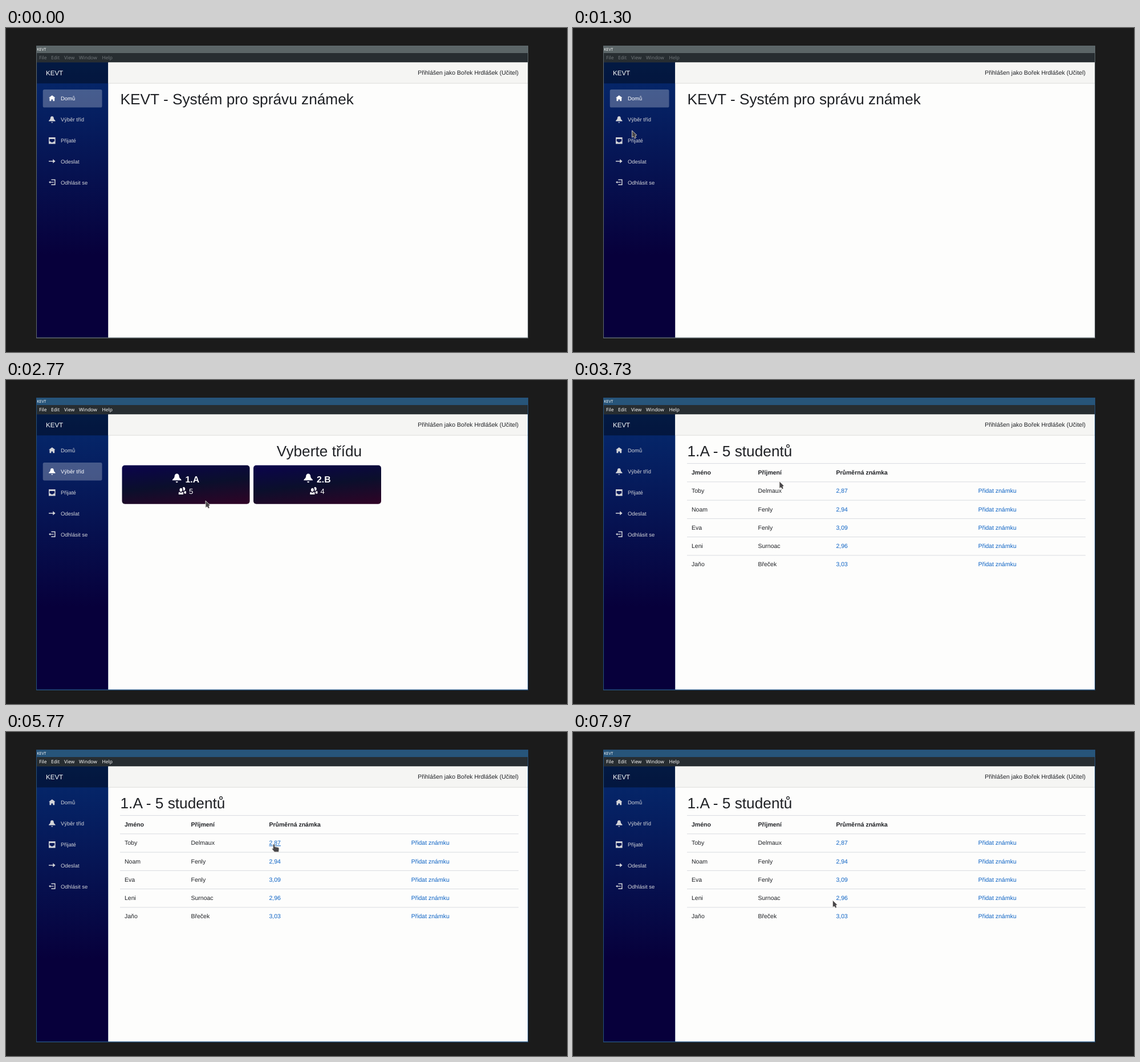
These frames come from a looping animation (984 by 569 pixels, 8 s). An HTML page:

```html
<!DOCTYPE html>
<html lang="cs">
<head>
<meta charset="utf-8">
<title>Správa známek</title>
<style>
html, body { margin: 0; width: 100%; height: 100%; overflow: hidden; background: #1b1b1b; }
svg { display: block; width: 100%; height: 100%; }
text { font-family: "Liberation Sans", Arial, sans-serif; font-size: 10.5px; fill: #1f2125; text-rendering: geometricPrecision; white-space: pre; }
.ui { font-family: "Noto Sans", sans-serif; font-size: 8.4px; }
.bold { font-weight: 700; }
.h1 { font-size: 26.25px; }
.h2 { font-size: 21px; }
.mid { text-anchor: middle; }
.end { text-anchor: end; }
.link { fill: #0b62c4; }
.light { fill: #fff; }
.brand { font-size: 11.55px; fill: #fff; }
.item { fill: #d4d5d9; }
.item text { font-size: 9.45px; fill: inherit; }
.item rect { fill: none; }
.item.hover, .item.on { fill: #fff; }
.item.hover rect { fill: rgba(255,255,255,.1); }
.item.on rect { fill: rgba(255,255,255,.26); }
.frame { fill: #5f696d; }
.bar { fill: #5b6567; }
.menu { fill: #70767a; }
.active .frame { fill: #25517c; }
.active .bar { fill: #27557a; }
.active .menu { fill: #fcfcfc; }
.name { font-size: 15.75px; font-weight: 700; fill: #fff; }
.count { font-size: 13.1px; fill: #fff; }
.page { display: none; }
</style>
</head>
<body>
<svg id="stage" viewBox="0 0 984 569" preserveAspectRatio="none"></svg>
<script>
const ICONS = {
  home: "M4 0l-4 3h1v4h2v-2h2v2h2v-4.03l1 .03-4-3z",
  bell: "M4 0c-1.1 0-2 .9-2 2 0 1.04-.52 1.98-1.34 2.66-.41.34-.66.82-.66 1.34h8c0-.52-.24-1-.66-1.34-.82-.68-1.34-1.62-1.34-2.66 0-1.1-.89-2-2-2zm-1 7c0 .55.45 1 1 1s1-.45 1-1h-2z",
  inbox: "M0 0v8h8v-8zm1 2h6v3h-1l-1 1h-2l-1-1h-1z",
  arrow: "M5 1v2h-5v1h5v2l3-2.53z",
  logout: "M3 0v1h4v5h-4v1h5v-7zm-1 2l-2 1.5 2 1.5v-1h4v-1h-4z",
  people: "M5.5 0c-.51 0-.95.35-1.22.88.45.54.72 1.28.72 2.13 0 .29-.03.55-.09.81.19.11.38.19.59.19.83 0 1.5-.9 1.5-2s-.67-2-1.5-2zm-3 1c-.83 0-1.5.9-1.5 2s.67 2 1.5 2 1.5-.9 1.5-2-.67-2-1.5-2zm4.75 3.16c-.43.51-1.02.82-1.69.84.27.38.44.84.44 1.34v.66h2v-1.66c0-.52-.31-.97-.75-1.19zm-6.5 1c-.44.22-.75.67-.75 1.19v1.66h5v-1.66c0-.52-.31-.97-.75-1.19-.45.53-1.06.84-1.75.84s-1.3-.32-1.75-.84z"
};
const APP = "KEVT";
const ITEMS = [["home", "Domů"], ["bell", "Výběr tříd"], ["inbox", "Přijaté"], ["arrow", "Odeslat"], ["logout", "Odhlásit se"]];
const STUDENTS = [
  ["Toby", "Delmaux", "2,87"], ["Noam", "Fenly", "2,94"], ["Eva", "Fenly", "3,09"],
  ["Leni", "Surnoac", "2,96"], ["Jaňo", "Břeček", "3,03"]
];
// One field per weight, separated by "|"
const GRADES = [
  "Mathematics||||2|||4,5|4|4,3|1,3",
  "Physics|1|4,1,2||||5||4,4|2|",
  "Chemistry||2|||||3||1,2,1|",
  "Biology||1|2||||1,2||2|",
  "Geography|||5,1|5|1||||3|",
  "History|5||5||1||4||4,2|1",
  "English||4|4||3|5|2|1,3|4|5",
  "German|4||3||2|5,1|1|2,5,5||"
];
const COLS = [208, 345.7, 385, 457, 512.8, 552.4, 591.8, 648.5, 705, 777, 849.6];
const ITEM_TOP = 108, ITEM_STEP = 36.9, ITEM_H = 31.5;

const text = (x, y, s, cls = "", more = "") => `<text x="${x}" y="${y}" class="${cls}" ${more}>${s}</text>`;
const rect = (x, y, w, h, fill, r = 0, more = "") => `<rect x="${x}" y="${y}" width="${w}" height="${h}" rx="${r}" fill="${fill}" ${more}/>`;
const box = (x, y, w, h, cls) => `<rect x="${x}" y="${y}" width="${w}" height="${h}" class="${cls}"/>`;
const icon = (name, x, y, size) => `<path fill-rule="evenodd" transform="translate(${x} ${y}) scale(${size / 8})" d="${ICONS[name]}"/>`;
const rule = (y, x = 200, h = 1) => rect(x, y - h / 2, 899 - x, h, "#d9dbe0");
const page = body => `<g class="page">${body}</g>`;

function shell() {
  const menus = [[58, "File"], [79, "Edit"], [102, "View"], [128, "Window"], [168.6, "Help"]];
  return box(53, 31, 863, 514, "frame") + box(54, 32, 861, 11.5, "bar") +
    text(54.2, 40, APP, "ui", 'style="font-size:7px;fill:#f4f5f5"') +
    rect(54, 44, 861, 17, "#272d31") + menus.map(([x, s]) => text(x, 55, s, "ui menu")).join("") +
    rect(54, 60.5, 125.3, 483, "url(#side)") + rect(54, 60.5, 125.3, 36.8, "rgba(0,0,0,.4)") +
    text(70, 82.8, APP, "brand") +
    rect(179.3, 60.5, 735.7, 483, "#fdfdfc") + rect(179.3, 60.5, 735.7, 36.5, "#f5f5f3") +
    rect(179.3, 96.7, 735.7, .8, "#d5d5d4") +
    text(899, 82.4, "Přihlášen jako Bořek Hrdlášek (Učitel)", "end");
}

const sidebar = () => ITEMS.map(([name, label], i) => {
  const y = ITEM_TOP + i * ITEM_STEP;
  return `<g class="item"><rect x="64.7" y="${y}" width="103.8" height="${ITEM_H}" rx="2.6"/>` +
    icon(name, 75, y + 10.2, 11.6) + text(96, y + 19.2, label) + "</g>";
}).join("");

const card = (x, name, count) => rect(x, 149.8, 224, 68, "url(#card)", 5) +
  `<g class="light">${icon("bell", x + 88.3, 164.5, 15.75)}${icon("people", x + 99.3, 188, 13.1)}</g>` +
  text(x + 111, 180, name, "name") + text(x + 117.6, 200, count, "count");

function students() {
  const xs = [208, 324.5, 461.5, 710.7];
  let out = text(200.5, 134.4, "1.A - 5 studentů", "h1");
  ["Jméno", "Příjmení", "Průměrná známka"].forEach((s, i) => out += text(xs[i], 166, s, "bold"));
  for (let i = 0; i < 6; i++) out += rule(146.6 + i * 32.27);
  STUDENTS.forEach((row, i) => [...row, "Přidat známku"].forEach((s, j) =>
    out += text(xs[j], 198.3 + i * 32.27, s, j > 1 ? "link" : "", i == 0 && j == 2 ? 'id="avg"' : "")));
  return out;
}

function grades() {
  let out = text(549.5, 134.4, "Seznam známek", "h1 mid") + text(549.5, 166.2, "Známky od Toby Delmaux", "h2 mid") +
    rule(177) + text(345.7, 196.3, "Váha", "bold") + rule(209.5, 338, 1.4) + rule(242.3, 200, 1.4);
  COLS.forEach((x, i) => out += text(x, 229.3, i || "Předmět", "bold"));
  GRADES.forEach((row, i) => {
    const y = 262 + i * 32.3;
    if (i) out += rule(y + 13 - 32.3);
    row.split("|").forEach((s, j) => {
      if (s) out += text(COLS[j], y, j ? s.replace(/\d/g, '<tspan class="link">$&</tspan>') : s);
    });
  });
  const button = (x, w, s) => rect(x + .3, 511.3, w - .6, 24.4, "#1b6ec2", 2.6, 'stroke="#1861ac" stroke-width=".7"') +
    text(x + w / 2, 527.2, s, "light mid");
  return out + button(476, 47.5, "Export") + button(526.3, 96.7, "Zobrazit průměry");
}

const stage = document.getElementById("stage");
stage.innerHTML = `<defs>
  <linearGradient id="side" x2="0" y2="1"><stop stop-color="#052a6e"/><stop offset=".7" stop-color="#07003b"/></linearGradient>
  <linearGradient id="card" gradientUnits="objectBoundingBox" x1=".15" y1="-.5" x2=".85" y2="1.5">
    <stop offset=".1" stop-color="#0b0058"/><stop offset=".5" stop-color="#0b0f2c"/><stop offset=".88" stop-color="#3a0024"/>
  </linearGradient></defs>` +
  shell() + sidebar() +
  page(text(200.5, 134.4, APP + " - Systém pro správu známek", "h1")) +
  page(text(549.5, 134.4, "Vyberte třídu", "h1 mid") + card(203.5, "1.A", 5) + card(434, "2.B", 4)) +
  page(students()) + page(grades()) +
  `<g id="cursor" fill="#49474a" stroke="#eceae4" stroke-width=".8" stroke-linejoin="round">
    <path d="M0 0V12.2L2.8 10.6 5 13.8 7 12.6 5.8 9 8.2 8Z"/>
    <path d="M-1.5 .8Q0-1 1.5 .8V4.5L7 5.6Q9 6 9 8L8.4 13.8H1L-3.4 8.6Q-3.6 6.8-1.5 7.8Z"/></g>`;

const pages = [...stage.querySelectorAll(".page")];
const items = [...stage.querySelectorAll(".item")];
const cursor = document.getElementById("cursor");
const [arrow, hand] = cursor.children;
const avg = document.getElementById("avg");

const LOOP = 8000, ENTER = 60, FOCUS = 1870;
const STEPS = [[0, 0], [1930, 1], [3700, 2], [6000, 3], [7870, 2]];
// Pointer: time, x, y
const PATH = [
  [60, 906, 330], [830, 798, 84], [1300, 103.5, 180], [1630, 112, 160], [2480, 100, 166],
  [2770, 350, 212], [3040, 338, 510], [3330, 331, 234], [3500, 362, 178], [3730, 362, 178],
  [4120, 590, 168], [4500, 700, 150], [4720, 690, 245], [5050, 430, 306], [5330, 306, 215],
  [5600, 470, 197], [6000, 470, 197], [6200, 491, 225], [6530, 527, 492], [6760, 600, 400],
  [7000, 622, 168], [7380, 570, 306], [7830, 455.5, 295.5], [8000, 455.5, 295.5]
];

function pointer(t) {
  const i = Math.max(1, PATH.findIndex(p => p[0] > t));
  const [t0, x0, y0] = PATH[i - 1], [t1, x1, y1] = PATH[i];
  const u = Math.max(0, (t - t0) / (t1 - t0)), k = u * u * (3 - 2 * u);
  return [x0 + (x1 - x0) * k, y0 + (y1 - y0) * k];
}

function draw(t) {
  const now = STEPS.filter(s => s[0] <= t).pop()[1];
  const [x, y] = pointer(t), shown = t >= ENTER;
  const row = (y - ITEM_TOP) / ITEM_STEP;
  const inItem = shown && x > 64.7 && x < 168.5 && row >= 0 && (row % 1) * ITEM_STEP < ITEM_H;
  const over = inItem ? Math.floor(row) : -1;
  const onLink = now == 2 && x > 461 && x < 483 && y > 187 && y < 201;
  const point = onLink || (over >= 0 && over < items.length);

  stage.classList.toggle("active", t >= FOCUS);
  pages.forEach((p, i) => p.style.display = i == now ? "inline" : "none");
  items.forEach((el, i) => {
    el.classList.toggle("on", now < 2 && i == now);
    el.classList.toggle("hover", i == over);
  });
  avg.style.textDecoration = onLink ? "underline" : "none";
  cursor.style.display = shown ? "inline" : "none";
  cursor.setAttribute("transform", `translate(${x.toFixed(2)} ${y.toFixed(2)})`);
  arrow.style.display = point ? "none" : "inline";
  hand.style.display = point ? "inline" : "none";
}

const start = performance.now();
function tick() {
  draw((performance.now() - start) % LOOP);
  requestAnimationFrame(tick);
}
draw(0);
requestAnimationFrame(tick);
</script>
</body>
</html>
```
